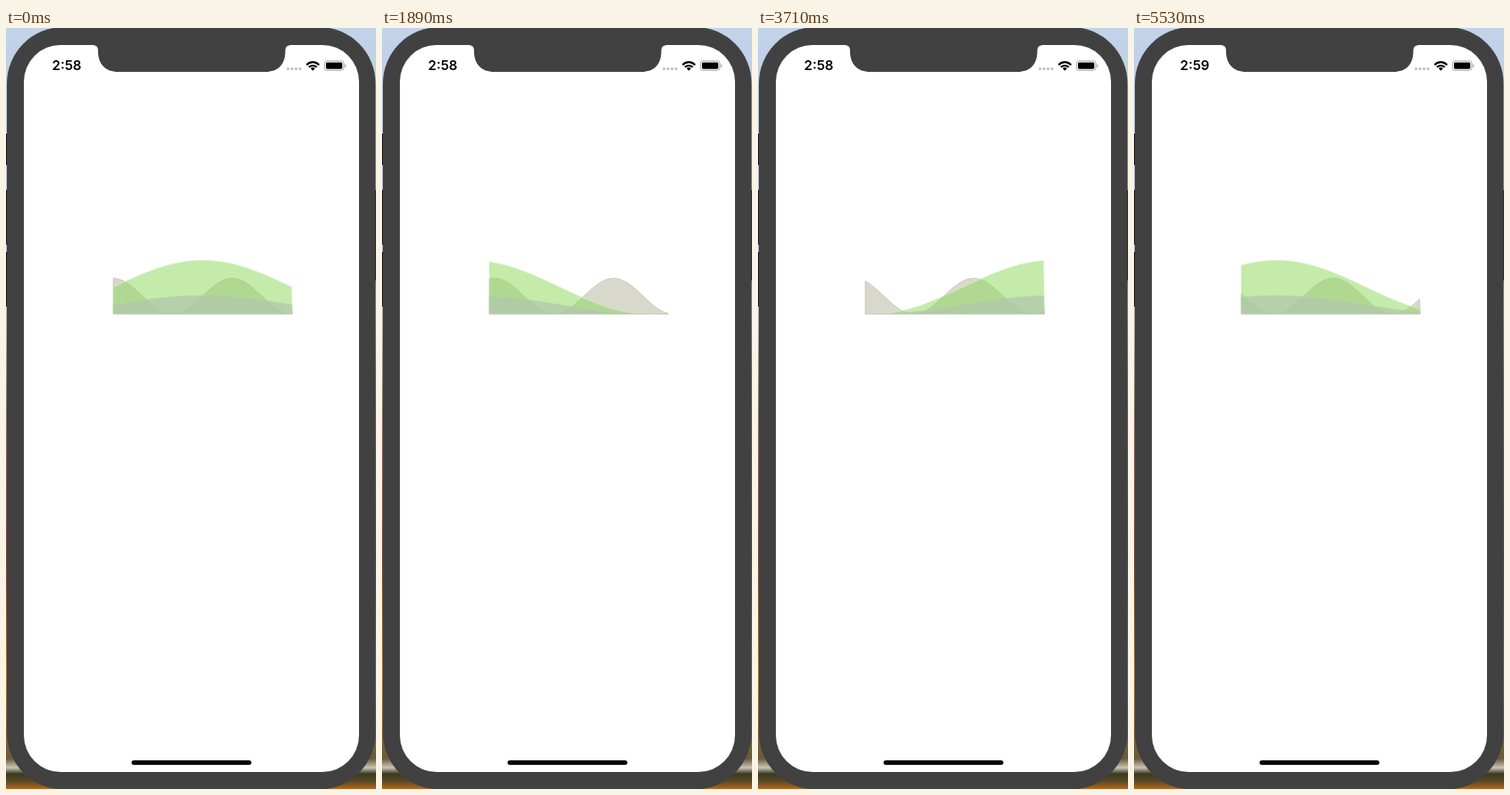
Recreate the animation shown at these times as an HTML page. Size 414 by 850 pixels, loop 5.6 s.

```html
<!DOCTYPE html>
<html lang="en">
<head>
<meta charset="utf-8">
<title>Waves</title>
<style>
  html, body { margin: 0; width: 100%; height: 100%; overflow: hidden; }
  svg { display: block; width: 414px; height: 850px; }
  #clock { font: 600 15px Inter, sans-serif; }
</style>
</head>
<body>
<svg viewBox="0 0 414 850">
  <defs>
    <linearGradient id="wall" x2="0" y2="1">
      <stop offset="0" stop-color="#c3d3e9"/>
      <stop offset=".13" stop-color="#bccbe0"/>
      <stop offset=".38" stop-color="#b9b6b8"/>
      <stop offset=".5" stop-color="#8d7778"/>
      <stop offset=".7" stop-color="#7c4a3c"/>
      <stop offset=".85" stop-color="#a87a3c"/>
      <stop offset=".96" stop-color="#6b5a38"/>
      <stop offset=".972" stop-color="#c9c4b4"/>
      <stop offset=".98" stop-color="#3a3a22"/>
      <stop offset=".99" stop-color="#5a4a25"/>
      <stop offset="1" stop-color="#b5661c"/>
    </linearGradient>
  </defs>

  <rect width="414" height="850" fill="url(#wall)"/>
  <path fill="#1c1c1c" d="M0 118h3v35h-3zM0 181h3v61h-3zM0 250h3v61h-3zM412 181h2v101h-2z"/>
  <rect x="1" y="-1" width="412.5" height="851.5" rx="63" fill="#414141"/>
  <rect x="20" y="19" width="375" height="812" rx="41" fill="#fff"/>
  <path fill="#414141" d="M97 18V19Q103 19 103 25V26C103 40 111 49 126 49H290C305 49 312.5 40 312.5 26V25Q312.5 19 319 19V18Z"/>

  <text id="clock" x="68" y="47.4" text-anchor="middle">2:58</text>
  <g fill="#c4c4c4">
    <circle cx="315.6" cy="45.6" r="1.7"/>
    <circle cx="320.1" cy="45.6" r="1.7"/>
    <circle cx="324.6" cy="45.6" r="1.7"/>
    <circle cx="329.1" cy="45.6" r="1.7"/>
  </g>
  <g fill="none" stroke="#000" stroke-width="2.1">
    <path d="M336.3 41.2A9.6 9.6 0 0 1 350.3 41.2"/>
    <path d="M338.9 43.8A6.2 6.2 0 0 1 347.7 43.8"/>
  </g>
  <path d="M340.9 45.3A3.4 3.4 0 0 1 345.7 45.3L343.3 47.8Z"/>
  <rect x="356.4" y="36.9" width="21.6" height="10.4" rx="2.6" fill="none" stroke="#a6a6a6"/>
  <rect x="358" y="38.5" width="18.3" height="7.2" rx="1.4"/>
  <path fill="#a0a0a0" d="M379.2 40.2Q380.6 40.8 380.6 42.1T379.2 44Z"/>
  <rect x="140.5" y="818" width="134" height="5" rx="2.5"/>

  <g id="waves" stroke-width="1"></g>
</svg>
<script>
const LOOP = 5600, TICK = 70;
const LEFT = 120, RIGHT = 319.6, BASE = 319.5;

// amp, length and crest positions in px; speed in px per ms.
// The opening pose holds until 140 ms, then the waves jump and run.
const waves = [
  { amp: 20, length: 400 / 3, rest: 253, start: 148.1, speed: 0.06338,
    fill: 'rgb(217,216,204)', stroke: 'rgba(185,185,172,.6)' },
  { amp: 30, length: 400, rest: 220, start: 277.8, speed: 0.12647,
    fill: 'rgba(143,216,91,.52)', stroke: 'rgba(214,243,196,.6)' },
  { amp: 10.3, length: 400, rest: 220, start: 277.8, speed: 0.12647,
    fill: 'rgba(178,199,173,.75)', stroke: 'rgba(183,208,172,.5)' }
];

const group = document.getElementById('waves');
const clock = document.getElementById('clock');

for (const w of waves) {
  w.path = document.createElementNS('http://www.w3.org/2000/svg', 'path');
  w.path.setAttribute('fill', w.fill);
  w.path.setAttribute('stroke', w.stroke);
  group.append(w.path);
}

function outline(w, crest) {
  let d = `M${LEFT} ${BASE}`;
  for (let i = 0; i <= 100; i++) {
    const x = LEFT + (RIGHT - LEFT) * i / 100;
    const y = BASE - w.amp * (1 + Math.cos(2 * Math.PI * (x - crest) / w.length));
    d += `L${x.toFixed(2)} ${y.toFixed(2)}`;
  }
  return d + `L320.4 ${BASE}Z`;
}

function draw(now) {
  const t = Math.floor(now % LOOP / TICK) * TICK;
  for (const w of waves) {
    const crest = t < 140 ? w.rest : w.start + w.speed * (t - 140);
    w.path.setAttribute('d', outline(w, crest));
  }
  clock.textContent = t < 4830 ? '2:58' : '2:59';
}

const begin = performance.now();
function loop() {
  draw(performance.now() - begin);
  requestAnimationFrame(loop);
}
loop();
</script>
</body>
</html>
```
